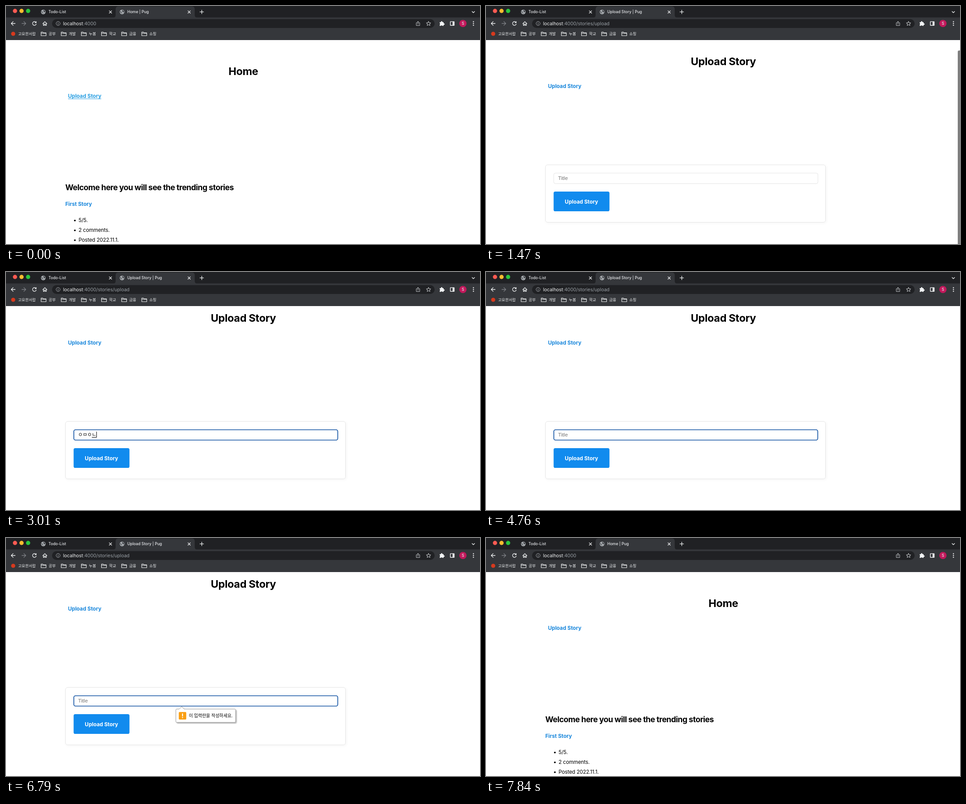
Animation of 1055 by 531 pixels, one loop 9590 ms. Source, as an HTML page:

```html
<!DOCTYPE html>
<html lang="ko">
<head>
<meta charset="utf-8">
<title>Upload Story</title>
<style>
  html, body { margin: 0; width: 100%; height: 100%; overflow: hidden; background: #fff; }
  svg { display: block; width: 100%; height: 100%; }
  text { font-family: Inter, "Noto Sans CJK KR", "Noto Sans CJK", sans-serif; white-space: pre; }
  .h1 { font-size: 23.4px; font-weight: 700; letter-spacing: -.3px; text-anchor: middle; }
  .h2 { font-size: 17.5px; font-weight: 700; letter-spacing: -.5px; }
  .link { font-size: 11.7px; font-weight: 700; fill: #1b88dc; }
  .body { font-size: 11.5px; letter-spacing: -.1px; }
  .tab { font-size: 8.6px; font-weight: 500; fill: #e8eaed; }
  .url { font-size: 10.4px; fill: #9aa0a6; }
  .ko { font-family: "Noto Sans CJK KR", "Noto Sans CJK", "Noto Sans CJK JP", sans-serif; }
  .mark { font-size: 8.5px; font-weight: 500; fill: #f1f3f4; }
  .hint { font-family: "Liberation Sans", Arial, sans-serif; font-size: 11.7px; fill: #757575; }
  .line { fill: none; stroke: #f1f3f4; stroke-width: 1.3; stroke-linecap: round; stroke-linejoin: round; }
</style>
</head>
<body>
<svg id="stage" viewBox="0 0 1055 531" xmlns="http://www.w3.org/2000/svg"></svg>
<script>
const LOOP = 9590, STEP = 70;
const ENTER = 280, LEAVE = 7700;
const KEY_W = 10.2, TEXT_X = 160.5;

// [time, value] pairs; the value holds until the next pair
const scroll = [[0, 0], [1400, 9], [1470, 22], [1540, 35], [1610, 41], [1680, 42.5], [1890, 43.5], [1960, 44], [2030, 43]];
const keys = [[2240, 0], [2660, 1], [2800, 2], [2870, 3], [3010, 4], [3710, 3], [3850, 2], [3990, 1], [4130, 0], [4200, 0], [6090, 0]];

const text = (x, y, cls, str, extra = '') => `<text x="${x}" y="${y}" class="${cls}" ${extra}>${str}</text>`;
const rect = (x, y, w, h, r, extra) => `<rect x="${x}" y="${y}" width="${w}" height="${h}" rx="${r}" ${extra}/>`;
const dot = (x, y, r, fill) => `<circle cx="${x}" cy="${y}" r="${r}" fill="${fill}"/>`;
const line = (d, extra = '') => `<path class="line" d="${d}" ${extra}/>`;
const at = (x, y, inner, extra = '') => `<g transform="translate(${x} ${y})" ${extra}>${inner}</g>`;

const globe = x => at(x, 13.3, dot(0, 0, 5.2, '#a6aaae') +
  '<path d="M-4.4-1.2C-2-1-1 0-1.2 1.2S.6 2.4 0 4.3C-3-.2-4.6 1-4.4-1.2ZM-1-4.2 1.2-2.6 .4-1 2.4.6 4.3.2C4.2-2.6 2-4.4-1-4.2Z" fill="#3a3d41"/>');
const cross = (x, y, r, extra) => line(`M${x - r} ${y - r}l${2 * r} ${2 * r}m0 ${-2 * r}l${-2 * r} ${2 * r}`, extra);
const folder = x => at(x, 62,
  line('M.6-3.6h3.8l1.3 1.3h6V4.2H.6ZM.6-1h11', 'style="stroke-width:1.1"'));
const arrow = (x, dir, color) => at(x, 39,
  line(`M${4.4 * dir} 0H${-4.2 * dir}M0-4.4L${-4.4 * dir} 0L0 4.4`, `style="stroke:${color}"`));

function browser() {
  const labels = ['공부', '개발', '누봄', '학교', '금융', '쇼핑'];
  return rect(0, 0, 1055, 26, 0, 'fill="#202124"') +
    rect(0, 25.5, 1055, 50.5, 0, 'fill="#35373b"') +
    '<path d="M238 26q6 0 6-6V7q0-6 6-6H414q6 0 6 6V20q0 6 6 6Z" fill="#35373b"/>' +
    ['#fb5b53', '#fdbc2f', '#2ac73f'].map((c, i) => dot(20 + 14.6 * i, 11, 4.7, c)).join('') +
    globe(83) + globe(258.3) +
    text(94.5, 16.3, 'tab', 'Todo-List') + text(270, 16.3, 'tab', '', 'id="tab"') +
    cross(232.5, 13.3, 2.7) + cross(407.7, 13.3, 2.7) +
    line('M431.7 13.2h8M435.7 9.2v8') + line('M1037.4 12.2l2.8 2.8 2.8-2.8') +
    arrow(16, 1, '#f1f3f4') + arrow(39.7, -1, '#7d8085') +
    line('M66.6 36.3A4.2 4.2 0 1 0 67.3 40.3M67.2 34.6v2.7h-2.8', 'id="reload"') +
    cross(63.3, 39, 3.6, 'id="stop"') +
    line('M82 39.2l4.5-4.2 4.5 4.2M83.3 38.5v4.8h2.1v-2.9h2.2v2.9h2.1v-4.8') +
    rect(102.5, 29.3, 851.5, 19.6, 9.8, 'fill="#202124"') +
    '<circle cx="116" cy="39" r="4.4" fill="none" stroke="#a0a5aa"/>' +
    line('M116 38.6v2.6M116 36.8v.1', 'style="stroke:#a0a5aa;stroke-width:1.1"') +
    text(127, 42.7, 'url', '<tspan fill="#f1f3f4">localhost</tspan>:4000<tspan id="path"></tspan>') +
    line('M915 37.4h-1.8v6.2h7.6v-6.2H919M917 41v-6.6M915.2 36l1.8-1.8 1.8 1.8', 'style="stroke:#c4c7ca;stroke-width:1"') +
    line('M940.5 34.3l1.4 3.2 3.5.3-2.6 2.3.8 3.4-3.1-1.8-3.1 1.8.8-3.4-2.6-2.3 3.5-.3Z', 'style="stroke:#d5d8da;stroke-width:1"') +
    '<path d="M965.3 36h2.8a1.7 1.7 0 1 1 3.2 0h2.7v2.8a1.7 1.7 0 1 1 0 3.2v2.3h-2.7a1.7 1.7 0 0 0-3.2 0h-2.8v-2.7a1.7 1.7 0 0 0 0-3Z" fill="#f1f3f4"/>' +
    rect(989, 34.9, 8.6, 8.4, .6, 'fill="none" stroke="#f1f3f4" stroke-width="1.4"') +
    rect(994, 34.9, 3.8, 8.4, 0, 'fill="#f1f3f4"') +
    dot(1017, 39, 8.1, '#c2185b') +
    text(1017, 42.2, 'tab', 'S', 'text-anchor="middle"') +
    [-4, 0, 4].map(d => dot(1040.4, 39 + d, 1.2, '#f1f3f4')).join('') +
    dot(16, 62, 4.6, '#d63a1e') + text(27, 65.2, 'mark ko', '고요한서랍') +
    labels.map((s, i) => folder(77.5 + 44.8 * i) + text(95 + 44.8 * i, 65.2, 'mark ko', s)).join('');
}

function home() {
  const items = ['5/5.', '2 comments.', 'Posted 2022.11.1.'];
  return text(132, 411, 'h2', 'Welcome here you will see the trending stories') +
    text(132, 446.3, 'link', 'First Story') +
    items.map((s, i) => dot(153.3, 478.6 + 22 * i, 1.9, '#000') + text(161.5, 482.2 + 22 * i, 'body', s)).join('');
}

function form() {
  return rect(132.5, 376.5, 623, 128, 4.5, 'fill="#fff" stroke="#e6e6e6" filter="url(#soft)"') +
    rect(150.8, 394.8, 588, 23.6, 3.8, 'fill="#fff" stroke="#e4e4e4"') +
    rect(151, 395, 587.4, 23, 3.8, 'id="ring" fill="none" stroke="#1455a6" stroke-width="1.7"') +
    text(160.5, 410.3, 'hint', 'Title', 'id="hint"') +
    text(TEXT_X, 409.8, 'ko', '', 'id="typed" font-size="11.1"') +
    rect(0, 411.3, KEY_W, 1.1, 0, 'id="compose"') +
    rect(0, 399.2, 1, 13, 0, 'id="caret"') +
    rect(150.5, 436, 124.3, 44, 3.6, 'id="button"') +
    text(212.5, 462.7, 'link', 'Upload Story', 'text-anchor="middle" style="fill:#fff"');
}

function bubble() {
  return '<path d="M380 381.7h5.4l5.6-5.4 5.6 5.4H509q2 0 2 2v25.6q0 2-2 2H380q-2 0-2-2v-25.6q0-2 2-2Z" fill="#fff" stroke="#8f8f8f" stroke-width=".9" filter="url(#drop)"/>' +
    rect(384.6, 388.3, 16.6, 16.6, 1.6, 'fill="#fa9f14"') +
    rect(391.8, 391.4, 2.2, 6.6, .4, 'fill="#fff"') + rect(391.8, 399.5, 2.2, 2.2, .4, 'fill="#fff"') +
    text(407, 400, 'ko', '이 입력란을 작성하세요.', 'font-size="9.7"');
}

document.getElementById('stage').innerHTML =
  '<defs><filter id="soft"><feDropShadow dx="1.5" dy="1.5" stdDeviation="3" flood-color="#f4f4f4"/></filter>' +
  '<filter id="drop"><feDropShadow dx="2" dy="2" stdDeviation="1.1" flood-opacity=".32"/></filter></defs>' +
  rect(0, 0, 1055, 531, 0, 'fill="#fff"') +
  '<g id="page">' + text(528.3, 153.6, 'h1', '', 'id="title"') +
  text(138, 205.3, 'link', 'Upload Story', 'id="nav"') +
  rect(138, 206.6, 74, 1, 0, 'id="under" fill="#2a9fe2"') +
  `<g id="home">${home()}</g><g id="form">${form()}</g></g>` +
  rect(1050, 0, 7, 500, 3, 'id="thumb" fill="#7e7e7e"') +
  `<g id="bubble">${bubble()}</g>` + browser();

const el = {};
document.querySelectorAll('#stage [id]').forEach(n => el[n.id] = n);

const held = (list, t) => list.reduce((cur, p) => p[0] <= t ? p : cur, list[0]);
const ramp = (t, a, b) => Math.min(1, Math.max(0, (t - a) / (b - a)));
const within = (t, a, b) => t >= a && t < b;
const show = (node, on) => node.setAttribute('opacity', Number(on));

function draw(now) {
  const t = Math.floor((now % LOOP) / STEP) * STEP;
  const upload = within(t, ENTER, LEAVE);
  const offset = upload ? held(scroll, t)[1] : 0;
  const name = upload ? 'Upload Story' : 'Home';

  el.title.textContent = name;
  el.tab.textContent = name + ' | Pug';
  el.path.textContent = upload ? '/stories/upload' : '';
  el.page.setAttribute('transform', `translate(0 ${-offset})`);
  show(el.home, !upload);
  show(el.form, upload);

  const loading = within(t, 210, 420) || within(t, 7630, 7840);
  show(el.reload, !loading);
  show(el.stop, loading);

  const hover = t < 910;
  el.nav.style.fill = hover ? '#2a9fe2' : '';
  show(el.under, hover);

  el.thumb.setAttribute('y', 80 + .87 * offset);
  show(el.thumb, t < 1400 ? 0 : 1 - ramp(t, 1960, 2310));

  const [since, count] = held(keys, t);
  const focus = within(t, 2240, 4900) || within(t, 6090, LEAVE);
  show(el.ring, focus ? 1 : within(t, 4900, 4970) ? .5 : 0);
  show(el.hint, count === 0 && !within(t, 4130, 4200));
  el.typed.textContent = 'ㅇㅁㅇㄴ'.slice(0, count);
  el.compose.setAttribute('x', TEXT_X + KEY_W * (count - 1));
  show(el.compose, count > 0 && t < 3710);
  el.caret.setAttribute('x', TEXT_X + KEY_W * count - .2);
  show(el.caret, focus && (t - since) % 1050 < 560);

  el.button.setAttribute('fill', within(t, 5810, 6160) ? '#14a7ff' : '#118bee');
  show(el.bubble, ramp(t, 6090, 6370) * (1 - ramp(t, 7000, 7420)));
}

let start;
function tick(now) {
  start ??= now;
  draw(now - start);
  requestAnimationFrame(tick);
}
draw(0);
requestAnimationFrame(tick);
</script>
</body>
</html>
```
